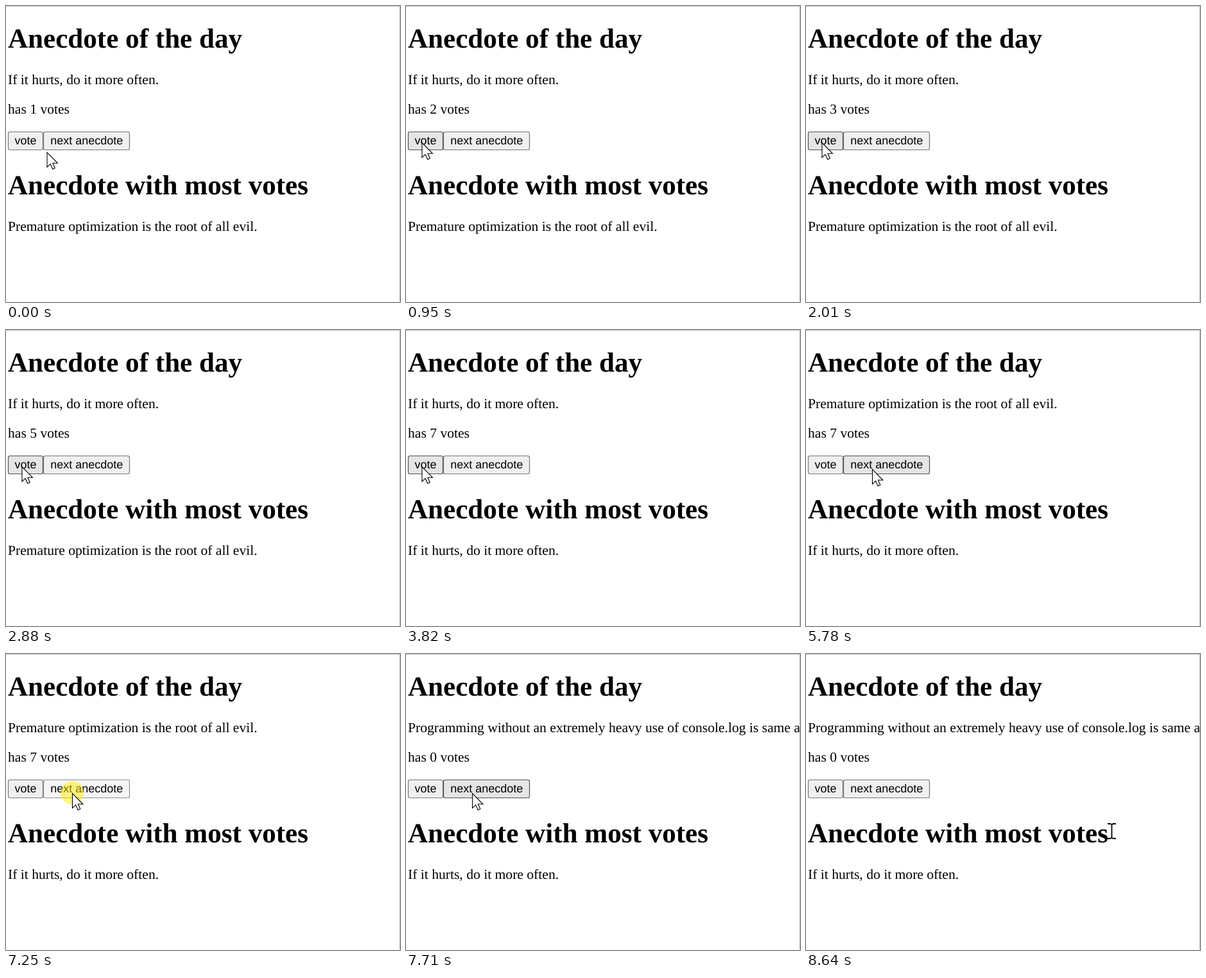
Animation, 614 px wide and 462 px high, one loop 8.71 s. Source, as an HTML page:

```html
<!DOCTYPE html>
<html lang="en">
<head>
<meta charset="utf-8">
<title>Anecdotes</title>
<style>
  html, body { margin: 0; width: 100%; height: 100%; overflow: hidden; background: #fff; }
  svg { display: block; width: 614px; height: 462px; }
  text { text-rendering: geometricPrecision; white-space: pre; }
  .h { font: bold 43.1px "Liberation Serif", "Times New Roman", serif; }
  .p { font: 21.6px "Liberation Serif", "Times New Roman", serif; }
  .b { font: 18px "Liberation Sans", Arial, sans-serif; }
  .btn { fill: #efefef; stroke: #767676; stroke-width: 1.2; }
  .hover { fill: #e5e5e5; stroke: #4f4f4f; }
  .down { fill: #f5f5f5; stroke: #8d8d8d; }
</style>
</head>
<body>
<svg viewBox="0 0 614 462">
  <text class="h" x="3" y="65">Anecdote of the day</text>
  <text class="p" x="3" y="122" id="quote"></text>
  <text class="p" x="3" y="168" id="count"></text>
  <rect class="btn" id="vote" x="3.5" y="196.5" width="54" height="28" rx="2.5"/>
  <rect class="btn" id="next" x="58.5" y="196.5" width="134" height="28" rx="2.5"/>
  <text class="b" x="13.6" y="216">vote</text>
  <text class="b" x="69.2" y="216">next anecdote</text>
  <text class="h" x="3" y="294">Anecdote with most votes</text>
  <text class="p" x="3" y="351" id="best"></text>
  <path d="M0 .5H613.5V462" fill="none" stroke="#c0c0c0"/>
  <circle id="spot" r="18" fill="#ffee00" fill-opacity=".5"/>
  <path id="arrow" d="M0 .6V23.4L5.1 18.7L8.7 26.6L12.3 25L8.9 17.3H16.4Z" fill="#fff" stroke="#000" stroke-width="1.1"/>
  <path id="beam" d="M-6.5 -11.5H-2L0 -10L2 -11.5H6.5M0 -10V10M-6.5 11.5H-2L0 10L2 11.5H6.5" fill="none" stroke="#000" stroke-width="1.8"/>
</svg>
<script>
const LOOP = 8710, TICK = 67, HOLD = 235;
const HURTS = "If it hurts, do it more often.";
const EVIL = "Premature optimization is the root of all evil.";
const LOG = "Programming without an extremely heavy use of console.log is same as if";
const DEBUG = "Debugging is twice as hard as writing the code in the first place. Therefore,";

// Moments the mouse button is let go
const votes = [950, 1610, 2280, 2880, 3280, 3820, 4280];
const nexts = [5510, 5780, 6590, 7450, 7970];
const quotes = [HURTS, DEBUG, EVIL, EVIL, LOG, LOG];
const score = { [HURTS]: 1, [EVIL]: 7, [DEBUG]: 0, [LOG]: 0 };

const home = { x: 64, y: 228 };
const moves = [
  { start: 70, steps: 5, x: 25, y: 213, dip: 12 },
  { start: 4830, steps: 4, x: 103.5, y: 217, dip: 0 },
  { start: 8570, steps: 2, x: 476.5, y: 276.5, dip: 0 }
];

const $ = id => document.getElementById(id);
const passed = (times, t) => times.filter(time => time <= t).length;
const show = (id, on) => $(id).setAttribute("visibility", on ? "visible" : "hidden");
const write = (id, s) => { if ($(id).textContent !== s) $(id).textContent = s; };

// The pointer eases along each move in even ticks
function pointerAt(t) {
  let pos = home;
  for (const m of moves) {
    if (t < m.start) break;
    const p = Math.min(1, (Math.floor((t - m.start) / TICK) + 1) / m.steps);
    const k = p * p * (3 - 2 * p);
    pos = {
      x: pos.x + (m.x - pos.x) * k,
      y: pos.y + (m.y - pos.y) * k + m.dip * Math.sin(Math.PI * p)
    };
  }
  return pos;
}

function paint(t) {
  const pos = pointerAt(t);
  const down = [...votes, ...nexts].some(up => t >= up - HOLD && t < up);
  const quote = quotes[passed(nexts, t)];
  const cast = passed(votes, t);
  const hurts = score[HURTS] + cast;

  write("quote", quote);
  write("count", `has ${quote === HURTS ? hurts : score[quote]} votes`);
  write("best", hurts >= score[EVIL] ? HURTS : EVIL);

  for (const id of ["vote", "next"]) {
    const { x, y, width, height } = $(id).getBBox();
    const over = pos.x > x && pos.x < x + width && pos.y > y && pos.y < y + height;
    $(id).setAttribute("class", "btn" + (over ? (down ? " down" : " hover") : ""));
  }

  const overText = pos.y > 255;
  show("arrow", !overText);
  show("beam", overText);
  show("spot", down);
  for (const id of ["arrow", "beam", "spot"])
    $(id).setAttribute("transform", `translate(${pos.x} ${pos.y})`);
}

const start = performance.now();
function tick() {
  paint((performance.now() - start) % LOOP);
  requestAnimationFrame(tick);
}
tick();
</script>
</body>
</html>
```
